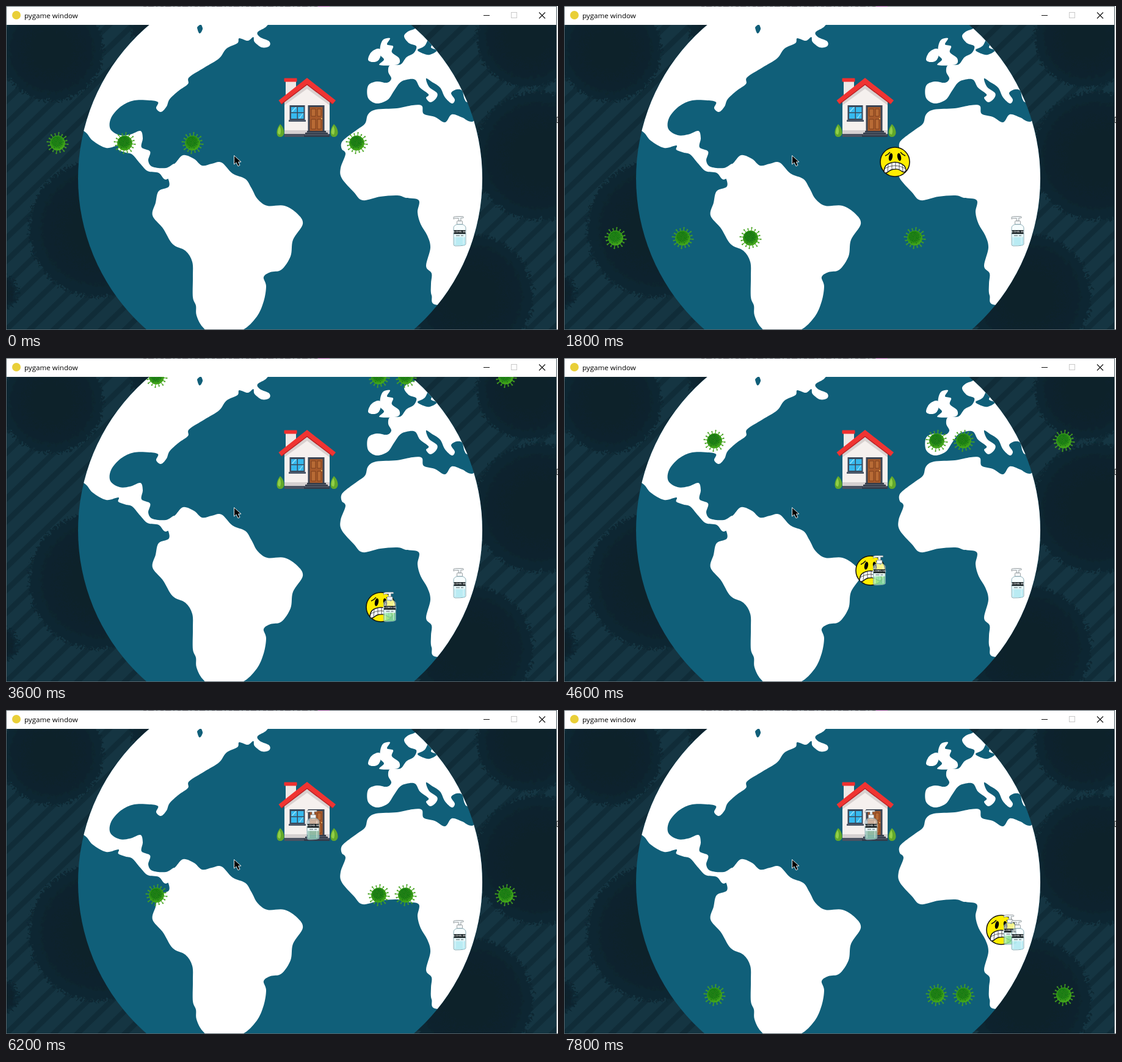
Animation, 904 px wide and 532 px high, one loop 8000 ms. Source, as an HTML page:

```html
<!DOCTYPE html>
<html lang="en">
<head>
<meta charset="utf-8">
<title>pygame window</title>
<style>
html, body { margin: 0; width: 100%; height: 100%; overflow: hidden; background: #12303c; }
svg { position: absolute; left: 0; top: 0; width: 904px; height: 532px; }
text { font-family: "Open Sans", "Noto Sans", sans-serif; }
.label { font: bold 3.1px Arial, "Liberation Sans", sans-serif; fill: #fff; text-anchor: middle; }

.move { animation: 8s infinite; }
#waveA { animation-name: fallA; }
#waveB { animation-name: fallB; }
#player { animation: trip 8s infinite, playerShown 8s step-end infinite; }
#carried { animation: carriedShown 8s step-end infinite; }
#stored { animation: storedShown 8s step-end infinite; }

/* The game redraws every 200 ms, so each segment is cut into 200 ms steps. */
@keyframes fallA {
  0%    { transform: translateY(225px); animation-timing-function: steps(6); }
  15%   { transform: translateY(319px); animation-timing-function: steps(3); }
  22.5% { transform: translateY(381px); animation-timing-function: steps(5); }
  35%   { transform: translateY(481px); animation-timing-function: steps(2); }
  40%   { transform: translateY(521px); animation-timing-function: steps(1); }
  42.5%, 100% { transform: translateY(600px); }
}
@keyframes fallB {
  0%    { transform: translateY(-60px); animation-timing-function: steps(1); }
  42.5% { transform: translateY(9px); animation-timing-function: steps(1); }
  45%   { transform: translateY(31px); animation-timing-function: steps(5); }
  57.5% { transform: translateY(136px); animation-timing-function: steps(8); }
  77.5% { transform: translateY(304px); animation-timing-function: steps(5); }
  90%   { transform: translateY(410px); animation-timing-function: steps(3); }
  97.5%, 100% { transform: translateY(468px); }
}
@keyframes trip {
  0%    { transform: translate(504px, 240px); animation-timing-function: steps(1); }
  20%   { transform: translate(504px, 240px); animation-timing-function: steps(1); }
  22.5% { transform: translate(542px, 256px); animation-timing-function: steps(3); }
  30%   { transform: translate(647px, 301px); animation-timing-function: steps(2); }
  35%   { transform: translate(740px, 340px); animation-timing-function: steps(4); }
  45%   { transform: translate(614px, 409px); animation-timing-function: steps(5); }
  57.5% { transform: translate(502px, 349px); animation-timing-function: steps(7); }
  75%   { transform: translate(489px, 189px); animation-timing-function: steps(1); }
  85%   { transform: translate(514px, 246px); animation-timing-function: steps(5); }
  97.5%, 100% { transform: translate(716px, 361px); }
}
@keyframes playerShown { 0%, 77.5% { opacity: 0; } 20%, 85%, 100% { opacity: 1; } }
@keyframes carriedShown { 0%, 77.5% { opacity: 0; } 35%, 97.5%, 100% { opacity: 1; } }
@keyframes storedShown { 0% { opacity: 0; } 77.5%, 100% { opacity: 1; } }
</style>
</head>
<body>

<svg viewBox="0 0 904 532">
  <defs>
    <pattern id="stripes" width="27" height="27" patternUnits="userSpaceOnUse" patternTransform="rotate(46)">
      <rect width="27" height="27" fill="#153542"/>
      <rect width="9" height="27" fill="#102c38"/>
    </pattern>
    <filter id="rough" x="-10%" y="-10%" width="120%" height="120%">
      <feTurbulence type="fractalNoise" baseFrequency=".16" numOctaves="2" seed="4"/>
      <feDisplacementMap in="SourceGraphic" scale="13" xChannelSelector="R" yChannelSelector="G"/>
    </filter>
    <radialGradient id="shade">
      <stop stop-color="#0c222b"/><stop offset=".75" stop-color="#0c232d"/><stop offset="1" stop-color="#0e2833"/>
    </radialGradient>
    <clipPath id="disc"><circle cx="449" cy="283" r="331"/></clipPath>
  </defs>
  <rect width="904" height="532" fill="url(#stripes)"/>
  <g id="shadows" fill="url(#shade)" filter="url(#rough)"/>
  <circle cx="449" cy="283" r="331" fill="#105f79"/>
  <g id="land" fill="#fff" clip-path="url(#disc)"/>

  <g id="house">
    <rect x="458" y="123" width="17" height="30" fill="#eee8e6"/>
    <rect x="455.5" y="118.500" width="21" height="6" rx="1" fill="#ef302f"/>
    <path d="M456 154L493 125L530 154V207H456z" fill="#f5f0ee"/>
    <path d="M456 157L493 130L530 157V163L493 136L456 163z" fill="#d8d1d0"/>
    <path d="M451 161L446.500 155L493 118L540 155L535 161L493 129z" fill="#f03432"/>
    <path d="M451 161L493 129L535 161" fill="none" stroke="#b92226" stroke-width="1.500"/>
    <rect x="456" y="204" width="74" height="11" fill="#d5d0d0"/>
    <rect x="456" y="210" width="74" height="5" fill="#4b5261"/>
    <rect x="464.500" y="163" width="25" height="26" fill="#3b4a5c"/>
    <path d="M467 166h9.500v8.500H467zM478 166h9.500v8.500H478zM467 176h9.500v9H467zM478 176h9.500v9H478z" fill="#36b9ee"/>
    <path d="M468 173l6-7h2l-7 8zM480 184l6-8h1l-6 9z" fill="#9be2fa"/>
    <rect x="463" y="187" width="28" height="3" fill="#4d596a"/>
    <rect x="494.500" y="163" width="27" height="43" fill="#3c4554"/>
    <rect x="497.500" y="166" width="21" height="40" fill="#a75a2b"/>
    <path d="M500 169h7v12h-7zM510 169h6v12h-6zM500 186h7v16h-7zM510 186h6v16h-6z" fill="#b96b35" stroke="#7c3e1c"/>
    <circle cx="517" cy="185" r="1" fill="#f1c26b"/>
    <path d="M493 205h31v3h3v3h3v4h-42v-4h2v-3h3z" fill="#343c4a"/>
    <path d="M491 208h35M489 211.500h40" stroke="#626b79"/>
    <g fill="#62a82a">
      <path id="bush" d="M449 194C453 197 456 204 455.500 209Q454 215 449 215Q444 215 443.500 209C443 204 446 197 449 194z"/>
      <use href="#bush" x="88"/>
      <path d="M448 197C450 201 451 206 449 211Q445 211 445 207Q445 202 448 197zM536 197C538 201 539 206 537 211Q533 211 533 207Q533 202 536 197z" fill="#92cf48"/>
    </g>
  </g>
</svg>

<svg viewBox="0 0 904 532">
  <defs>
    <radialGradient id="germ" cx=".45" cy=".4" r=".62">
      <stop stop-color="#197a13"/><stop offset=".5" stop-color="#187c12"/><stop offset="1" stop-color="#50b51c"/>
    </radialGradient>
    <g id="virus">
      <g id="spikes" stroke="#4ba922" stroke-width="1.200" fill="#3c971b"/>
      <circle r="12" fill="url(#germ)" stroke="#3b9c1a"/>
      <g id="studs" fill="#0a4d0a"/>
    </g>
    <g id="bottle">
      <path d="M-6.500 31V16Q-10 14-9.500 18z" fill="none"/>
      <path d="M-10-23.500Q-7-25-1-24.500H5Q7-24 6-22H2V-17H-2V-21.500H-7Q-9-21-10-20z" fill="#eef3f5" stroke="#777f83" stroke-width=".7"/>
      <rect x="-4.500" y="-17" width="9" height="6" rx="1" fill="#f4f6f7" stroke="#7c8488" stroke-width=".7"/>
      <path d="M-4-11.500H4Q9.500-10 10-6V21Q10 24-7 24Q-10 24-10 21V-6Q-9.500-10-4-11.500z" fill="#effbfd" fill-opacity=".55" stroke="#6f9aa5" stroke-width=".8"/>
      <path d="M-9 6H9V21Q8 23 6 23H-6Q-9 23-9 21z" fill="currentColor" fill-opacity=".7"/>
      <path d="M-7-7V21M6-7V21" stroke="#fff" stroke-opacity=".65"/>
      <rect x="-9.500" y="-2" width="19" height="6.500" fill="#111b1e"/>
      <rect x="-9" y="4.500" width="18" height="5" fill="#e7f8fa"/>
      <path d="M-6 7H0M2 7H6" stroke="#26373b" stroke-width=".8"/>
      <text class="label" y="2.400">ALCOHOL GEL</text>
    </g>
  </defs>

  <use id="stored" href="#bottle" x="503" y="189" color="#77bda5"/>

  <g id="player">
    <circle r="24" fill="#ffed00" stroke="#16140a" stroke-width="1.600"/>
    <path d="M-16-10Q-11-12-8-16M9-16Q12-12 17-10" fill="none" stroke="#111" stroke-width="1.500"/>
    <ellipse cx="-7" cy="-8" rx="3" ry="6.500" transform="rotate(12 -7 -8)"/>
    <ellipse cx="7" cy="-8" rx="3" ry="6.500" transform="rotate(-12 7 -8)"/>
    <path id="mouth" d="M-18 15Q-17 4-8 2Q0-1 8 2Q17 5 18 13Q18 18 12 16Q6 11 0 12Q-7 12-12 17Q-18 20-18 15z" fill="#fff" stroke="#111" stroke-width="1.400"/>
    <path d="M-17 11Q-8 6 0 6T17 11M-11 4L-12 16M-5 2V13M1 1V12M7 2V12M12 4L13 16" fill="none" stroke="#333" stroke-width=".8"/>
    <use id="carried" href="#bottle" x="14.500" color="#7be08a"/>
  </g>

  <use href="#bottle" x="743" y="370" color="#9fe4ef"/>
  <g id="waveA" class="move"></g>
  <g id="waveB" class="move"></g>

  <path d="M373.500 245.500V260L377 257L380 263L383 261.500L380.500 256H385z" fill="#000" stroke="#fff" stroke-width=".9"/>

  <g id="frame">
    <rect width="902" height="31" fill="#fff"/>
    <path d="M0 .5H902M.5 0V532M901.500 0V532M0 531.500H904" stroke="#58646a"/>
    <path d="M225 .5H530" stroke="#30343d" stroke-dasharray="5 3 9 4 2 5"/>
    <path d="M511 .5h19" stroke="#8c458f"/>
    <path d="M903 0V531" stroke="#eef0f1" stroke-width="2"/>
    <path d="M904 182.500H902V191.500H904" fill="none" stroke="#333"/>
    <circle cx="17" cy="15" r="7" fill="#e9cf38"/>
    <text x="30" y="20" font-size="11.600">pygame window</text>
    <path d="M782 15.500H792M873 10.500L883 20.500M883 10.500L873 20.500" stroke="#111" stroke-width="1.100"/>
    <rect x="827.500" y="10.500" width="9" height="9" fill="none" stroke="#c9c9c9"/>
  </g>
</svg>

<script>
const $ = id => document.getElementById(id);
const add = (parent, tag, attrs) => {
  const el = document.createElementNS("http://www.w3.org/2000/svg", tag);
  for (const key in attrs) el.setAttribute(key, attrs[key]);
  return $(parent).appendChild(el);
};

// Closed smooth curve through a few coast points.
function coast(text) {
  const pts = text.trim().split(/\s+/).map(p => p.split(",").map(Number));
  const at = i => pts[(i + pts.length) % pts.length];
  const handle = (i, side) => at(i).map((v, k) => v + side * (at(i + 1)[k] - at(i - 1)[k]) / 6);
  let d = "M" + pts[0];
  pts.forEach((_, i) => d += `C${handle(i, 1)} ${handle(i + 1, -1)} ${at(i + 1)}`);
  add("land", "path", { d });
}

// North and Central America
coast(`90,190 127,205 142,221 164,233 184,229 184,236 197,241 207,244 220,259 232,271 250,274
  262,285 280,270 276,259 262,266 240,264 233,254 236,239 222,232 224,217 220,205 203,211 186,212
  171,202 172,184 188,165 210,155 235,155 249,158 246,168 254,174 263,165 268,153 283,139 298,128
  300,117 325,101 349,86 361,70 379,61 382,53 396,57 405,51 407,59 419,68 431,66 431,58 416,51
  412,43 427,33 434,15 327,15 322,38 317,45 313,36 309,15 90,15`);
// South America
coast(`250,273 263,279 267,296 250,304 245,323 240,344 257,365 273,391 294,402 305,420 306,445
  306,478 311,492 312,508 322,527 342,540 385,533 410,511 422,485 426,460 422,445 433,437 451,433
  466,411 470,384 486,358 477,341 456,328 428,328 412,317 402,299 392,284 371,275 353,257 337,259
  321,262 308,251 290,245 276,259 262,267`);
// Africa
coast(`549,226 555,218 575,203 588,193 593,178 606,170 640,168 666,163 681,164 684,177 702,182
  719,191 730,178 747,183 763,190 800,186 800,480 709,491 697,475 696,456 697,439 688,427 695,397
  690,377 679,358 674,339 676,319 655,315 641,311 613,313 584,319 570,306 550,283 548,266 556,243 550,235`);
// Europe
coast(`593,131 607,124 624,126 631,119 626,108 629,97 646,96 656,84 668,77 672,66 660,61 652,50
  658,42 672,35 678,15 790,15 790,165 758,159 751,153 747,139 738,137 729,143 735,154 730,160
  719,150 711,134 698,125 688,119 693,133 706,143 704,152 695,158 688,151 692,145 678,134 670,121
  656,121 645,126 635,140 625,154 607,160 593,151`);
// Great Britain and Ireland
coast(`613,66 618,55 629,53 624,63 634,66 632,76 644,86 641,96 612,97 619,88 613,80`);
coast(`593,88 598,76 609,70 615,75 610,89 600,92`);
// Baltic Sea
const sea = coast(`674,72 686,65 695,48 702,57 696,68 706,73 694,80 683,78`);
$("land").lastChild.setAttribute("fill", "#105f79");

const shadows = [[75, 72, 82], [150, 366, 110], [285, 30, 78], [855, 50, 82], [872, 246, 104], [762, 476, 99], [-8, 470, 26]];
for (const [cx, cy, r] of shadows) {
  add("shadows", "circle", { cx, cy, r });
  add("shadows", "circle", { cx, cy, r, fill: "none", stroke: "#0e2832", "stroke-width": 9, "stroke-dasharray": "3 4" });
}

for (let i = 0; i < 16; i++) {
  const a = i * Math.PI / 8 + .12, r = i % 2 ? 15.5 : 17;
  const x = r * Math.cos(a), y = r * Math.sin(a);
  add("spikes", "path", { d: `M0 0L${x} ${y}` });
  add("spikes", "circle", { cx: x, cy: y, r: .9, "stroke-width": .6 });
}
for (let i = 0; i < 15; i++) {
  const a = i * 2.4, r = 2.55 * Math.sqrt(i);
  add("studs", "circle", { cx: r * Math.cos(a), cy: r * Math.sin(a), r: 1.1, stroke: "#48b52b", "stroke-width": .5 });
}

const waves = { waveA: [84.5, 194.5, 305.5, 574.5], waveB: [246.5, 610.5, 654.5, 818.5] };
for (const id in waves) for (const x of waves[id]) add(id, "use", { href: "#virus", x });
</script>
</body>
</html>
```
